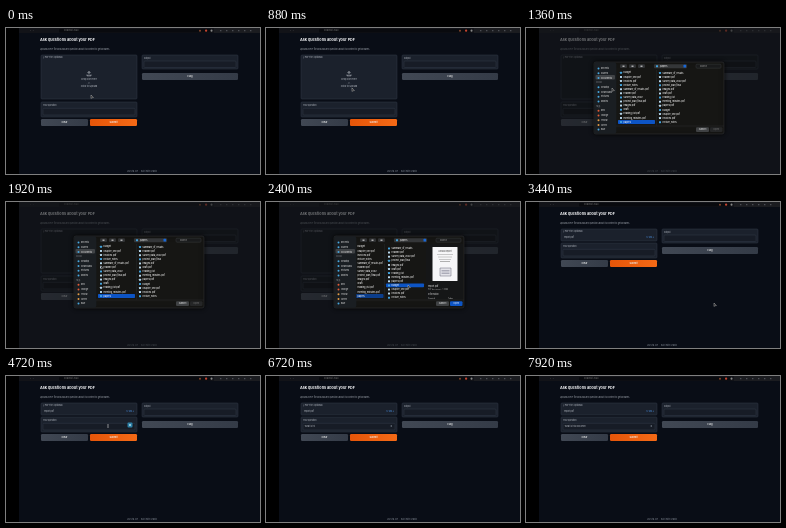
These frames come from a looping animation (254x146 px, 8 s). An HTML page with a canvas:

```html
<!DOCTYPE html>
<html lang="en">
<head>
<meta charset="utf-8">
<style>
  html, body { margin: 0; width: 100%; height: 100%; overflow: hidden; background: #000; }
  canvas { display: block; }
</style>
</head>
<body>
<canvas id="stage" width="254" height="146"></canvas>
<script>
const g = document.getElementById('stage').getContext('2d');
const LOOP = 8000;

const clamp = v => Math.max(0, Math.min(1, v));
const ramp = (t, a, b) => clamp((t - a) / (b - a));
const ease = p => p * p * (3 - 2 * p);
const mix = (a, b, p) => a + (b - a) * p;

function box(x, y, w, h, fill, stroke, r = 1) {
  g.beginPath();
  g.roundRect(x, y, w, h, r);
  g.fillStyle = fill;
  g.fill();
  if (stroke) {
    g.strokeStyle = stroke;
    g.lineWidth = .5;
    g.stroke();
  }
}

function text(s, x, y, size = 2.1, color = '#c3c8d0', align = 'left', weight = 400) {
  g.font = `${weight} ${size}px Inter, sans-serif`;
  g.textAlign = align;
  g.textBaseline = 'middle';
  g.fillStyle = color;
  g.fillText(s, x, y);
}

function button(x, y, w, label, top, bottom) {
  const shade = g.createLinearGradient(x, y, x + w, y + 7);
  shade.addColorStop(0, top);
  shade.addColorStop(1, bottom);
  box(x, y, w, 7, shade, null, 1.3);
  text(label, x + w / 2, y + 3.5, 2.4, '#eee', 'center', 600);
}

const EDGE = '#303846';
let panel, inset;

function field(x, y, label) {
  box(x, y, 96, 15, panel, EDGE);
  text(label, x + 2, y + 3.5);
  box(x + 2, y + 6.3, 92, 6.7, inset, EDGE);
}

function drawBrowser() {
  box(0, 0, 254, 146, '#000', null, 0);
  box(13, 0, 241, 146, '#090d16', null, 0);
  box(13, 0, 241, 5, '#121318', null, 0);
  box(208, 0, 46, 5, '#1b1c20', null, 0);
  box(53, 1, 152, 3.4, '#090a0e');
  text('localhost:7860', 58, 2.7, 2.1, '#777');
  text('‹   ›', 24, 2.7, 2.2, '#777');
  box(193, 1.7, 2, 2, '#80452c');
  box(199, 1.5, 2.2, 2.2, '#c44430');
  box(204.5, 1.5, 2, 2.2, '#888');
  for (let x = 214; x < 248; x += 6) box(x, 2, 1.5, 1.3, '#55585e');
}

function drawUpload(loaded) {
  box(35, 27, 96, loaded ? 12 : 44, panel, EDGE);
  text('▯ PDF File (optional)', 37, 29.7);
  if (loaded) {
    text('report.pdf', 38, 35.2);
    text('1.2 MB ↓', 128, 35.2, 1.9, '#4b93e6', 'right');
    return;
  }
  g.strokeStyle = '#d0d4da';
  g.lineWidth = .6;
  g.beginPath();
  g.moveTo(81, 46.5); g.lineTo(81, 47.8); g.lineTo(85, 47.8); g.lineTo(85, 46.5);
  g.moveTo(83, 46.5); g.lineTo(83, 43.5);
  g.moveTo(81.5, 45); g.lineTo(83, 43.5); g.lineTo(84.5, 45);
  g.stroke();
  text('Drop File Here', 83, 51.3, 2.3, '#c3c8d0', 'center');
  text('- or -', 83, 55, 2, '#747b87', 'center');
  text('Click to Upload', 83, 58.8, 2.3, '#c3c8d0', 'center');
}

const QUESTION = 'What is this document about?';
// Typing pace: slow at first, then steady.
function typedChars(t) {
  return Math.floor(3 * ramp(t, 5040, 5900) + 8 * ramp(t, 5920, 6600) + 10 * ramp(t, 6600, 7950));
}

function drawPage(t, dimmed) {
  const loaded = t >= 3280;
  const y = loaded ? 41 : 74;
  panel = dimmed ? '#0a0e14' : '#1b212c';
  inset = dimmed ? '#080b10' : '#171c26';
  drawBrowser();
  text('Ask questions about your PDF', 34, 12, 3.75, '#f4f5f7', 'left', 700);
  text('Upload a PDF file and ask any question about its content to get answers.', 34, 21, 2.05, '#b0b6bf');
  drawUpload(loaded);
  field(35, y, 'Your question');
  button(35, y + 17, 47, 'Clear', '#414854', '#343b47');
  button(84, y + 17, 47, 'Submit', '#e55509', '#f56a16');
  box(136, 27, 96, 14, panel, EDGE);
  text('output', 138, 30.3);
  box(138, 33, 92, 6.5, inset, EDGE);
  button(136, 45, 96, 'Flag', '#414854', '#343b47');
  text('Use via API  ·  Built with Gradio', 136, 143, 2.1, '#858b96', 'center');

  if (t > 4160 && t < 5040) {
    box(121.5, 46.5, 5, 5, '#2c7fa5');
    box(123, 48, 2, 2, '#b4dcea');
  } else if (t >= 5040) {
    box(124.5, 49.2, 1.6, 1.6, '#78818d');
    text(QUESTION.slice(0, typedChars(t)), 38.8, 50.5, 2.05);
  }
}

const FILES = ['budget', 'chapter_one', 'invoices', 'lecture_notes', 'summary_of_results',
  'readme', 'survey_data_2022', 'project_plan_final', 'images', 'draft', 'reading_list', 'meeting_minutes', 'papers'];

function column(x, top, shift, icons, selected, color, width) {
  for (let i = 0; i < 13; i++) {
    const y = top + i * 4.1;
    if (i === selected) box(x - 2, y - 1.9, width, 3.8, color, null, .7);
    if (icons) box(x, y - 1, 2, 2, i % 3 ? '#b9d9ee' : '#42a4df', null, .4);
    text(FILES[(i + shift) % 13] + (i % 3 ? '.pdf' : ''), x + (icons ? 3.6 : 0), y, 2.2, '#fff', 'left', 500);
  }
}

function drawPreview() {
  box(160, 42, 37, 56, '#151617', null, 0);
  box(166.5, 45, 25, 34, '#f6f6f8', null, .6);
  text('Annual Report', 179, 49, 2, '#333', 'center');
  for (let i = 0; i < 4; i++) box(171 + i, 52.5 + i * 2.2, 16 - i * 2, .6, '#999', null, 0);
  box(174, 66, 11, 8, '#e4e4ea', '#667', 0);
  for (let y = 68; y < 73; y += 1.8) box(175.5, y, 8, .5, '#778', null, 0);
  text('report.pdf', 162, 84, 2.2, '#fff');
  text('PDF document - 1.2 MB', 162, 87, 1.8, '#aaa');
  text('Information', 162, 92, 2, '#ddd');
  text('Created                          Today', 162, 96, 1.8, '#bbb');
}

function drawSidebar() {
  box(68.3, 34.3, 22, 71.4, '#1a1e22', null, 2);
  box(69.5, 47, 19.5, 4.4, '#404346');
  const places = ['Recents', 'Shared', 'Documents', '', 'Desktop', 'Downloads', 'Pictures', 'Movies', '',
    'Red', 'Orange', 'Yellow', 'Green', 'Blue'];
  places.forEach((name, i) => {
    const y = 40.5 + i * 4.7;
    if (!name) return text(i < 5 ? 'iCloud' : 'Tags', 70, y, 1.9, '#85898f');
    box(71.5, y - 1, 2, 2, i < 8 || i > 12 ? '#46a7df' : i < 11 ? '#e35b35' : '#e39a45', null, 1);
    text(name, 75, y, 2.1, '#eee');
  });
}

function drawDialog(t) {
  const slide = ease(ramp(t, 1960, 2160));
  const chosen = t >= 2160;
  const closing = t >= 3000;
  g.shadowColor = '#000';
  g.shadowBlur = 5;
  box(68, 34, 130, 72, '#161614', '#35373a', 2);
  g.shadowColor = 'transparent';

  g.save();
  g.beginPath();
  g.rect(90, 42, 108, 55.5);
  g.clip();
  const split = mix(131, 119, slide);
  g.save();
  g.beginPath();
  g.rect(90, 42, split - 90, 56);
  g.clip();
  const faded = closing ? '#20262c' : '#0b3d8a';
  column(mix(94, 91.5, slide), 44.8, 0, slide < .5, 12, chosen ? faded : '#0d54c4', mix(37, 28, slide));
  g.restore();
  box(split - .5, 42, .4, 56, '#2c2d2e', null, 0);
  column(mix(133, 122, slide), mix(45, 46.5, slide), 4, true, chosen ? 9 : -1, closing ? '#2d3c50' : '#0d54c4', 38);
  if (chosen) drawPreview();
  g.restore();

  drawSidebar();
  for (let x = 94; x < 118; x += 9) {
    box(x, 36.3, 7, 3.8, '#303234');
    box(x + 2.5, 37.6, 2, 1.2, '#ccc', null, 0);
  }
  box(128, 36.2, 33, 4, '#343638');
  box(130, 37.2, 2, 2, '#43a4de', null, .4);
  text('papers', 134, 38.3, 2.3, '#fff');
  box(157.5, 36.8, 2.6, 2.8, '#1767d8', null, .6);
  box(170, 36.2, 25, 4, '#191a1b', '#393b3d');
  text('Search', 174, 38.3, 2.1, '#aaa');
  box(90, 97.8, 108, .4, '#2a2b2c', null, 0);
  box(170, 99.2, 13, 4.7, '#3f4143');
  text('Cancel', 176.5, 101.6, 2.3, '#fff', 'center');
  box(184, 99.2, 12.5, 4.7, !chosen ? '#252627' : closing ? '#333d4a' : '#0d54c4');
  text('Open', 190.2, 101.6, 2.3, chosen ? '#fff' : '#777', 'center');
}

// Pointer stops: [time, x, y]
const PATH = [[0, 85, 67], [80, 85, 67], [880, 86, 60], [1840, 86, 60], [2160, 142, 83],
  [2720, 142, 83], [2960, 188, 101], [3600, 188, 101], [3960, 102, 50], [LOOP, 102, 50]];

function drawPointer(t) {
  if (t >= 5040) return;
  const i = PATH.findIndex(p => p[0] > t);
  const [a, b] = [PATH[i - 1], PATH[i]];
  const p = ease(ramp(t, a[0], b[0]));
  const x = mix(a[1], b[1], p), y = mix(a[2], b[2], p);
  if (t >= 3960) {
    box(x - .3, y - 2, .6, 4, '#ddd', null, 0);
    return;
  }
  g.beginPath();
  g.moveTo(x, y);
  g.lineTo(x, y + 3.5);
  g.lineTo(x + .9, y + 2.7);
  g.lineTo(x + 2.4, y + 2.6);
  g.closePath();
  g.fillStyle = '#111';
  g.fill();
  g.strokeStyle = '#ddd';
  g.lineWidth = .4;
  g.stroke();
}

const layer = document.createElement('canvas');
layer.width = 254;
layer.height = 146;
const back = layer.getContext('2d');

function render(now) {
  const t = now % LOOP;
  const shown = ramp(t, 1040, 1200) * (1 - ramp(t, 3000, 3200));
  drawPage(t, shown > 0);
  if (shown > 0) {
    box(13, 0, 241, 146, `rgba(21,22,25,${.25 + .35 * shown})`, null, 0);
    // Blend the finished dialog as a whole so that its layers fade together.
    back.drawImage(g.canvas, 0, 0);
    drawDialog(t);
    g.globalAlpha = 1 - shown;
    g.drawImage(layer, 0, 0);
    g.globalAlpha = 1;
  }
  drawPointer(t);
  requestAnimationFrame(render);
}
requestAnimationFrame(render);
</script>
</body>
</html>
```
